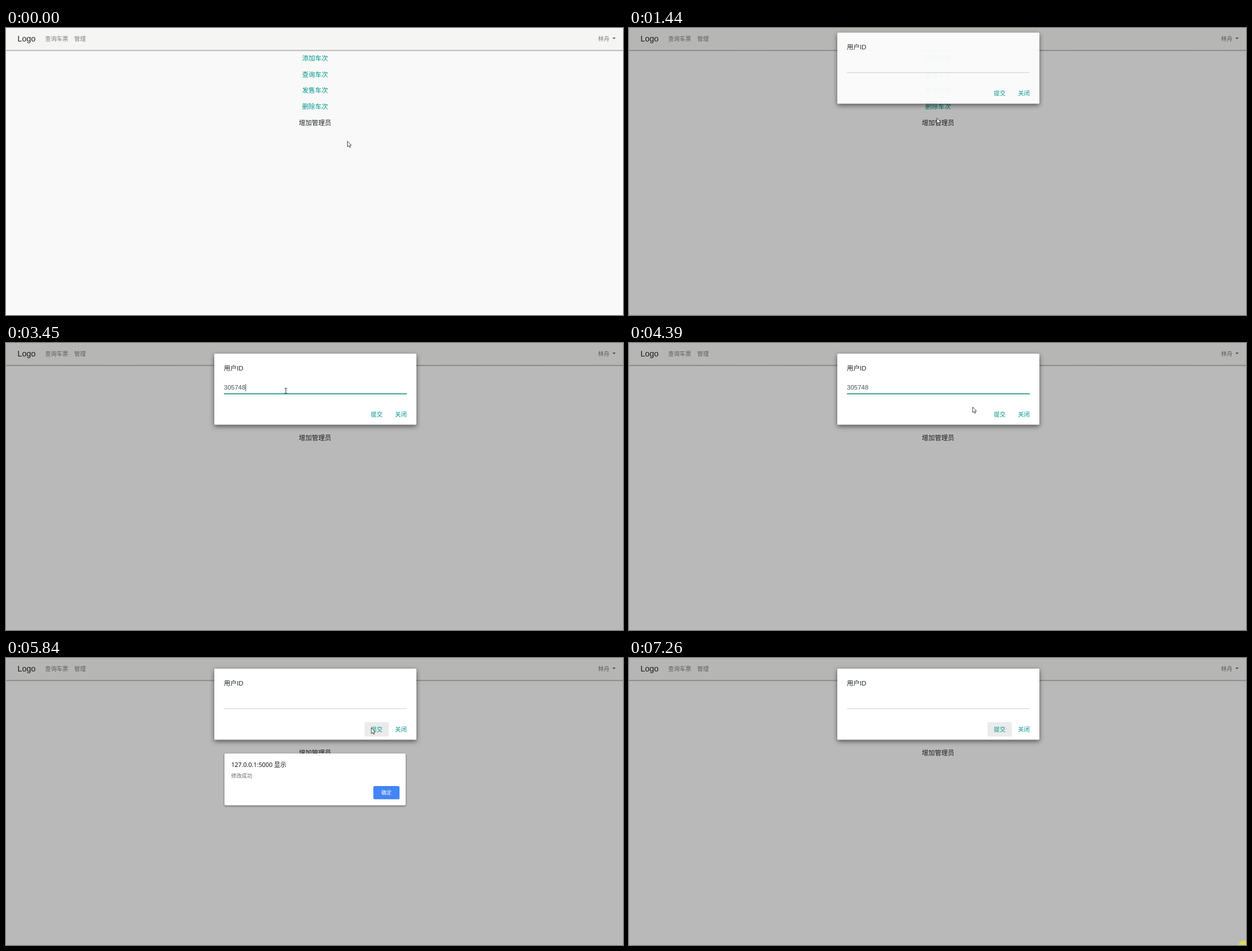
Recreate the animation shown at these times as an HTML page. Size 1096x511 px, loop 7310 ms.

```html
<!DOCTYPE html>
<html lang="zh-CN">
<head>
<meta charset="utf-8">
<style>
html, body { margin: 0; width: 100%; height: 100%; overflow: hidden; background: #f9f9f9; }
svg { display: block; font: 11.5px "Liberation Sans", "Noto Sans CJK SC", "Noto Sans CJK", sans-serif; fill: #212529; }
.nav { font-size: 10.25px; font-weight: 300; fill: #7f7f7e; }
.button { font-size: 10.4px; fill: #009688; }
.middle { text-anchor: middle; }
#menu { font-weight: 300; }
#menu text:not(:last-child) { fill: #009688; }
#dialog .sheet { fill: #fff; filter: drop-shadow(0 3.6px 4px rgba(0, 0, 0, .55)); }
#alert { font-family: "Noto Sans", "Noto Sans CJK SC", "Noto Sans CJK", sans-serif; }
#alert .sheet { fill: #fff; filter: drop-shadow(0 1px 1.5px rgba(0, 0, 0, .6)); }
</style>
</head>
<body>
<svg width="1096" height="511" viewBox="0 0 1096 511">
  <defs>
    <linearGradient id="edge" x2="0" y2="1">
      <stop stop-opacity=".34"/>
      <stop offset="1" stop-opacity="0"/>
    </linearGradient>
  </defs>
  <rect width="1096" height="511" fill="#f9f9f9"/>
  <rect width="1096" height="39" fill="#f5f5f3"/>
  <rect y="39" width="1096" height="3" fill="url(#edge)"/>
  <text x="20.5" y="24" font-size="14.36">Logo</text>
  <g class="nav">
    <text x="69.6" y="22.8">查询车票</text>
    <text x="121.3" y="22.8">管理</text>
    <text x="1051.5" y="22.8">林舟</text>
    <path d="M1077.2 17h5.8l-2.9 2.9z" fill="#666"/>
  </g>
  <g id="menu" class="middle"></g>
  <rect id="shade" width="1096" height="511" fill="#000"/>

  <g id="dialog">
    <rect class="sheet" x="370" y="19" width="359" height="126.5" rx="1.5"/>
    <text x="387" y="49">用户ID</text>
    <rect x="387" y="89.7" width="325" height="1" fill="#cfcfcf"/>
    <rect id="line" y="89.7" height="1.6" fill="#009688"/>
    <text id="entry" x="387" y="83.3" fill="#495057"></text>
    <rect id="caret" y="73" width="1" height="13" fill="#555"/>
    <rect id="hover" x="637" y="114.2" width="43" height="25.5" rx="1.5" fill="#ebebeb"/>
    <text class="button" x="648" y="131">提交</text>
    <text class="button" x="691" y="131">关闭</text>
  </g>

  <g id="alert">
    <rect class="sheet" x="388" y="170" width="322" height="92.5" rx="2"/>
    <text x="400" y="193.7" font-size="10.8" fill="#111">127.0.0.1:5000 显示</text>
    <text x="400" y="212.6" font-size="9.3" fill="#666">修改成功</text>
    <rect x="652.5" y="228" width="46.5" height="23.5" rx="2.5" fill="#4285f4"/>
    <text class="middle" x="675.8" y="243.4" font-size="9" font-weight="500" fill="#fff">确定</text>
  </g>

  <path id="arrow" d="M.5.5v10l2.3-2.1 1.6 3.4 1.6-.7-1.5-3.3h2.9z" fill="#fff" stroke="#333" stroke-width=".9"/>
  <path id="beam" d="M-2.2-4.5h1.6l.6.5.6-.5h1.6M0-4v8M-2.2 4.5h1.6l.6-.5.6.5h1.6" fill="none" stroke="#333"/>
  <circle id="spot" cx="1092" cy="512" r="9" fill="#e0dc55"/>
</svg>
<script>
const LOOP = 7310, ENTRY = "305748";
const FADE = 1150, OPEN = 1300, FOCUS = 1910;
const TYPE = 2590, TYPED = 3450, SUBMIT = 4600;
const ALERT = 5790, CONFIRM = 6270;

// Pointer moves to each target between two moments
const moves = [
  { from: 20, to: 350, x: 548, y: 162 },
  { from: 1400, to: 1790, x: 497, y: 85 },
  { from: 4050, to: SUBMIT, x: 664, y: 127 },
  { from: 4980, to: 5320, x: 658.5, y: 97.5 },
  { from: 5620, to: 5760, x: 648.5, y: 124 },
  { from: 5870, to: 6130, x: 668, y: 236 },
  { from: CONFIRM, to: 6510, x: 838, y: 337 },
  { from: 6730, to: 6900, x: 1110, y: 530 }
];

const get = id => document.getElementById(id);
const [shade, dialog, line, entry, caret, hover, alertBox, arrow, beam, spot] =
  ["shade", "dialog", "line", "entry", "caret", "hover", "alert", "arrow", "beam", "spot"].map(get);

get("menu").innerHTML = ["添加车次", "查询车次", "发售车次", "删除车次", "增加管理员"]
  .map((label, i) => `<text x="549" y="${58 + 28.7 * i}">${label}</text>`).join("");

const progress = (t, start, length) => Math.min(1, Math.max(0, (t - start) / length));
const easeOut = p => 1 - (1 - p) ** 1.7;
const smooth = p => p * p * (3 - 2 * p);
const show = (node, on) => node.style.display = on ? "" : "none";

function pointerAt(t) {
  let x = 606, y = 201;
  for (const move of moves) {
    const p = smooth(progress(t, move.from, move.to - move.from));
    x += (move.x - x) * p;
    y += (move.y - y) * p;
  }
  return [x, y];
}

function draw(t) {
  shade.setAttribute("opacity", .26 * progress(t, FADE, 150));
  show(dialog, t >= OPEN);
  dialog.setAttribute("opacity", progress(t, OPEN, 150));
  dialog.setAttribute("transform", `translate(0 ${-32 * (1 - easeOut(progress(t, OPEN, 300)))})`);

  const focused = t >= FOCUS && t < SUBMIT;
  const width = focused ? 325 * easeOut(progress(t, FOCUS, 300)) : 0;
  line.setAttribute("x", 549.5 - width / 2);
  line.setAttribute("width", width);

  // Steady typing; every key restarts the caret blink
  const interval = (TYPED - TYPE) / (ENTRY.length - 1);
  const typed = t < TYPE ? 0 : Math.min(ENTRY.length, 1 + Math.floor((t - TYPE) / interval));
  entry.textContent = t < SUBMIT ? ENTRY.slice(0, typed) : "";
  const lastInput = typed ? TYPE + (typed - 1) * interval : FOCUS;
  show(caret, focused && Math.floor((t - lastInput) / 530) % 2 === 0);
  caret.setAttribute("x", 387 + typed * 6.4);

  const [x, y] = pointerAt(t);
  const overField = t > OPEN && x > 387 && x < 712 && y > 70 && y < 92;
  const overButton = t > OPEN && x > 637 && x < 680 && y > 114 && y < 140;
  show(hover, t >= SUBMIT || overButton);
  show(alertBox, t >= ALERT && t < CONFIRM);
  show(arrow, !overField);
  show(beam, overField);
  for (const node of [arrow, beam]) node.setAttribute("transform", `translate(${x} ${y})`);
  show(spot, t >= 7260);
}

function tick() {
  draw(performance.now() % LOOP);
  requestAnimationFrame(tick);
}
tick();
</script>
</body>
</html>
```
